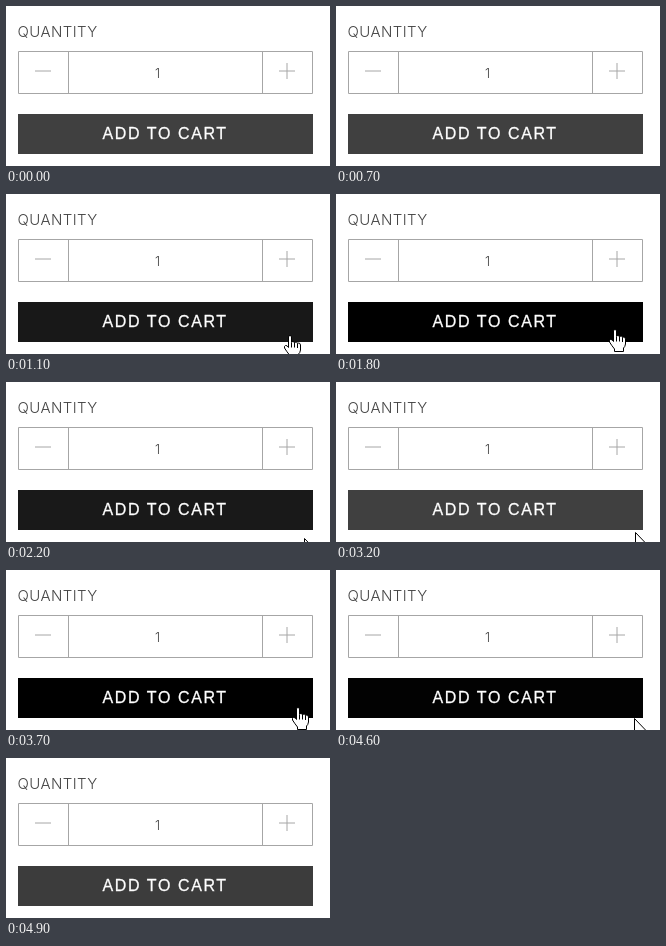
Write an HTML page that moves like this. It is 324 by 160 pixels and loops after 5400 ms.

```html
<!DOCTYPE html>
<html lang="en">
<head>
<meta charset="utf-8">
<title>Add to cart</title>
<style>
html, body { margin: 0; width: 100%; height: 100%; overflow: hidden; background: #fff; }
svg { display: block; }
.label { font: 300 15px Inter, Roboto, sans-serif; fill: #444; }
.button { font: 16px "Liberation Sans", Arial, sans-serif; letter-spacing: 1.6px; fill: #fff; stroke: #fff; stroke-width: .3px; }
.line { fill: none; stroke: #a6a6a6; }
.cursor { fill: #fff; stroke: #000; stroke-linejoin: round; }
</style>
</head>
<body>
<svg width="324" height="160" viewBox="0 0 324 160">
  <text class="label" x="11.5" y="31" letter-spacing=".4">QUANTITY</text>
  <path class="line" d="M12.5 45.5H306.5V87.5H12.5ZM62.5 45.5V87.5M256.5 45.5V87.5"/>
  <path class="line" d="M29 65H45M273 65H289M281 57V73"/>
  <text class="label" x="151.5" y="72" style="font-size:13px" text-anchor="middle">1</text>
  <rect id="button" x="12" y="108" width="295" height="40"/>
  <text class="button" x="96.5" y="133">ADD TO CART</text>
  <path id="arrow" class="cursor" d="M.5 .5V17L4.3 13.3L7 19L9 18L6.6 12.5H12Z"/>
  <path id="hand" class="cursor" d="M-1.5 12.5V2Q-1.5 .5 0 .5T1.5 2V7.5Q1.5 6.5 3 6.5T4.5 8Q5 7 6.2 7T7.5 8.8Q8 8 9 8T10.5 10V15Q10 18 8.5 19V22.5H-.5V20Q-3 17 -5.5 13Q-6 11 -4.5 10.5T-1.5 12.5ZM1.5 8V12.5M4.5 8V12.5M7.5 9V13"/>
</svg>
<script>
const LOOP = 5400, STEP = 100;
const ENTER = 700, LEAVE = 500, FADE = 400;
const BUTTON_BOTTOM = 148;
const edge = { x: 305, y: 163 };

// Each visit glides in from the edge, rests on the button and glides back out.
const visits = [
  { enter: 720, leave: 1770, x: 279, y: 135 },
  { enter: 3000, leave: 4270, x: 292, y: 137 }
];

const [button, arrow, hand] = ['button', 'arrow', 'hand'].map(id => document.getElementById(id));
const progress = (t, start, length) => Math.min(1, Math.max(0, (t - start) / length));
const easeOut = p => 1 - (1 - p) ** 2;

// Times at which the pointer crosses the button's lower edge
for (const v of visits) {
  const rest = Math.sqrt(1 - (edge.y - BUTTON_BOTTOM) / (edge.y - v.y));
  v.over = v.enter + ENTER * (1 - rest);
  v.out = v.leave + LEAVE * rest;
}

function pointer(t) {
  const v = visits.find(v => t < v.leave + LEAVE) || visits[0];
  const k = easeOut(progress(t, v.enter, ENTER)) - progress(t, v.leave, LEAVE) ** 2;
  const at = axis => Math.round(edge[axis] + (v[axis] - edge[axis]) * Math.max(0, k));
  return [at('x'), at('y')];
}

function draw(now) {
  const t = Math.floor(now % LOOP / STEP) * STEP;
  const [x, y] = pointer(t);
  const over = y < BUTTON_BOTTOM;
  for (const [cursor, shown] of [[arrow, !over], [hand, over]]) {
    cursor.setAttribute('transform', `translate(${x} ${y})`);
    cursor.style.display = shown ? '' : 'none';
  }
  const fade = start => easeOut(progress(t, start, FADE));
  const dark = visits.reduce((sum, v) => sum + fade(v.over) - fade(v.out), 0);
  const c = Math.round(64 * (1 - dark));
  button.setAttribute('fill', `rgb(${c},${c},${c})`);
}

const start = performance.now();
function tick() {
  draw(performance.now() - start);
  requestAnimationFrame(tick);
}
tick();
</script>
</body>
</html>
```
